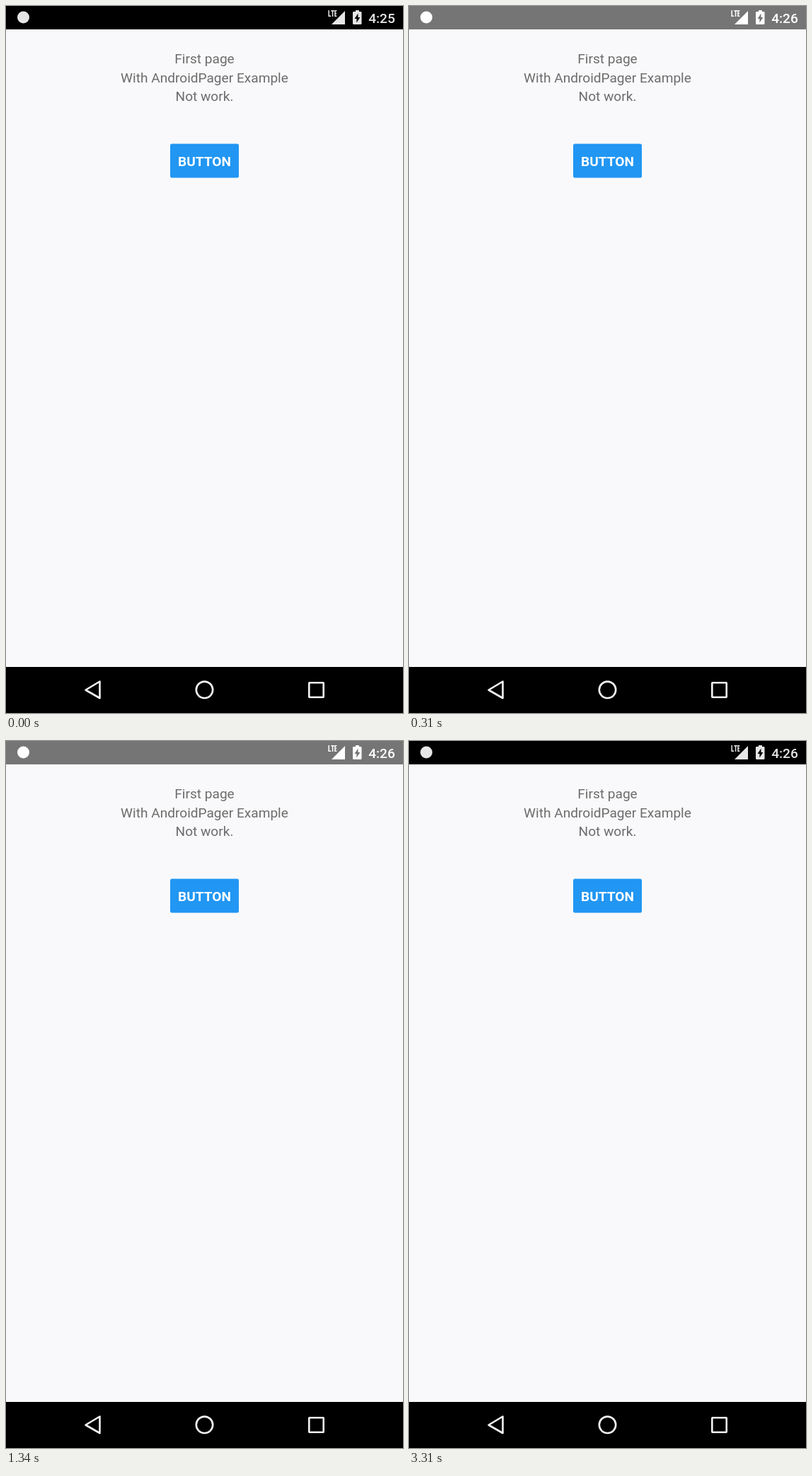
An HTML page that plays this animation: 561x998 px, repeating every 7100 ms.

```html
<!DOCTYPE html>
<html lang="en">
<head>
<meta charset="utf-8">
<title>Status bar change</title>
<style>
  html, body { margin: 0; width: 100%; height: 100%; overflow: hidden; }
  svg { display: block; width: 100%; height: 100%; }
  text { font-family: Roboto, sans-serif; font-size: 19.1px; text-anchor: middle; }
  .copy { fill: #6c6c6c; }
  .nav { fill: none; stroke: #f2f2f2; stroke-width: 2.6; stroke-linejoin: round; }
</style>
</head>
<body>
<svg viewBox="0 0 561 998">
  <rect width="561" height="998" fill="#f9f9fb"/>
  <rect id="bar" width="561" height="33"/>
  <g id="icons" fill="#fff">
    <circle cx="24.5" cy="16" r="8.5"/>
    <!-- network type, signal, charging battery -->
    <path d="M456.2 6v8.3h3M459.3 6.8h4.6M461.6 6.8v8.2M467.4 6.8h-2.4v7.5h2.4M465 10.5h2.2"
          fill="none" stroke="#fff" stroke-width="1.5"/>
    <path d="M479 7v19h-19z"/>
    <path fill-rule="evenodd" d="M494 6h5v2h2.2q1.3 0 1.3 1.3v15.4q0 1.3-1.3 1.3h-9.9q-1.3 0-1.3-1.3V9.300q0-1.300 1.300-1.300h2.700z
          M497.500 10.500l-5 7.500h2.900v5.500l5-7.500h-2.900z"/>
    <text id="clock" x="531" y="24" font-weight="500"></text>
  </g>

  <g class="copy">
    <text x="280.500" y="81">First page</text>
    <text x="280.500" y="107.500">With AndroidPager Example</text>
    <text x="280.500" y="134">Not work.</text>
  </g>
  <rect x="232" y="194.500" width="97" height="48" rx="2.500" fill="#2196f3"/>
  <text x="280.500" y="226" font-weight="700" fill="#fff">BUTTON</text>

  <rect y="933" width="561" height="65"/>
  <g class="nav">
    <path d="M112.500 965.500L132.500 953.500v23.500z"/>
    <circle cx="280.500" cy="965.300" r="11.700"/>
    <rect x="428.300" y="955.300" width="20.400" height="20.400" rx=".5"/>
  </g>
</svg>
<script>
const LOOP = 7100, GRAY_START = 40, GRAY_END = 2990;
const [bar, icons, clock] = ['bar', 'icons', 'clock'].map(id => document.getElementById(id));
const progress = (t, start, end) => Math.min(1, Math.max(0, (t - start) / (end - start)));

function draw(now) {
  const t = now % LOOP;
  const gray = t >= GRAY_START && t < GRAY_END;
  // Icons are slightly dimmed while the bar is opaque black.
  const brightness = progress(t, GRAY_START, 310) - progress(t, GRAY_END, 3310);
  bar.setAttribute('fill', gray ? '#757575' : '#000');
  icons.setAttribute('opacity', 0.9 + 0.1 * brightness);
  clock.textContent = t < GRAY_START ? '4:25' : '4:26';
}

const start = performance.now();
function tick() {
  draw(performance.now() - start);
  requestAnimationFrame(tick);
}
tick();
</script>
</body>
</html>
```
